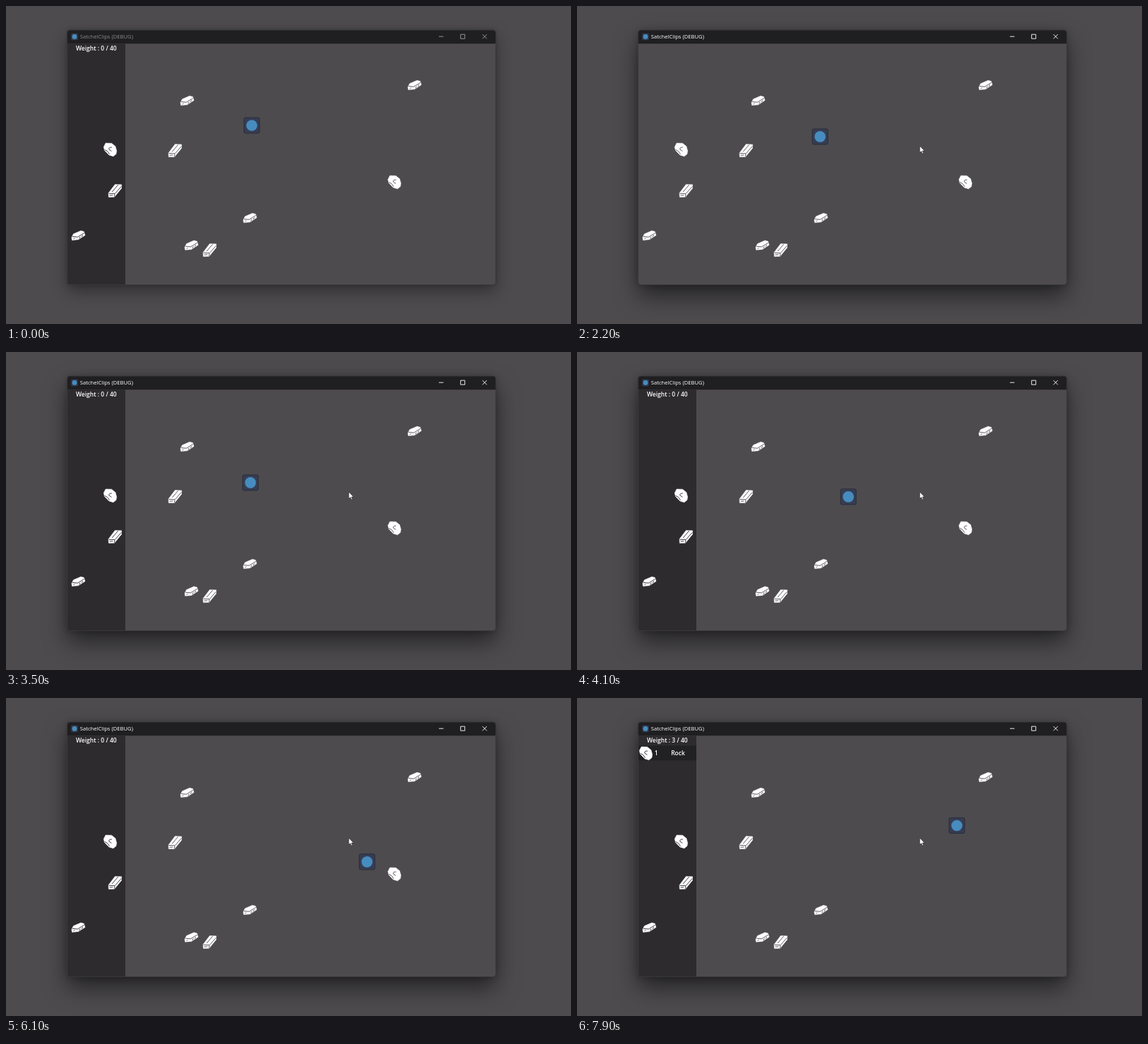
Animation, 800 px wide and 450 px high, one loop 8000 ms. Source, as an HTML page:

```html
<!DOCTYPE html>
<html lang="en">
<head>
<meta charset="utf-8">
<title>SatchelClips</title>
<style>
  html, body { margin: 0; width: 100%; height: 100%; overflow: hidden; background: #4d4b4e; }
  #stage { position: relative; width: 800px; height: 450px; overflow: hidden; background: #4d4b4e; }
  #shade { position: absolute; left: 87px; top: 34px; width: 606px; height: 360px; border-radius: 4px;
    box-shadow: 0 9px 22px rgba(0,0,0,.4), 0 0 5px rgba(0,0,0,.25); }
  .focus #shade { box-shadow: 0 16px 32px rgba(0,0,0,.54), 0 1px 9px rgba(0,0,0,.27); }
  svg { position: absolute; left: 0; top: 0; }
  .bar { fill: #8b8a8c; stroke: #a2a1a3; }
  .focus .bar { fill: #fff; stroke: #fff; }
  .bar text { font: 500 7.65px "Open Sans", "Noto Sans", sans-serif; stroke: none; }
  .bar path { fill: none; stroke-width: .9; }
  .hud text { font: 600 8.5px "Open Sans", "Noto Sans", sans-serif; fill: #fff; }
  .body { fill: #fff; stroke: #fff; stroke-width: .5; stroke-linejoin: round; }
  .cut { fill: none; stroke: #000; stroke-width: .9; stroke-linecap: round; stroke-linejoin: round; }
</style>
</head>
<body>
<div id="stage">
  <div id="shade"></div>
  <svg width="800" height="450" viewBox="0 0 800 450">
    <defs>
      <clipPath id="frame"><rect x="86.5" y="34" width="607" height="360.5" rx="4"/></clipPath>

      <mask id="ingotMask" maskUnits="userSpaceOnUse" x="-12" y="-12" width="24" height="24">
        <path class="body" d="M-9.5 3L-7-2.2L3.6-6.8L8-5.6L9.6-.4L0 5.8L-8.8 6.6Z"/>
        <path class="cut" d="M-8 1.6L-1 2.2L8-3.4M-6.6 5L-5.4 3.8M1.4 4L2.6 2M5 1.6L6-.4"/>
      </mask>
      <g id="ingot"><rect x="-12" y="-12" width="24" height="24" fill="#fff" mask="url(#ingotMask)"/></g>

      <mask id="plankMask" maskUnits="userSpaceOnUse" x="-12" y="-12" width="24" height="24">
        <path class="body" d="M-9.4 3.4L0-9L9.3-8.6L9-3.2L-.8 8.8L-9 9Z"/>
        <path class="cut" d="M-4 1.4L4-8M.4 3.6L8.4-5.6M-8.6 3.9L-.4 4.2L-.8 8M-7.4 6.6L-3.4 6.4"/>
      </mask>
      <g id="plank"><rect x="-12" y="-12" width="24" height="24" fill="#fff" mask="url(#plankMask)"/></g>

      <mask id="rockMask" maskUnits="userSpaceOnUse" x="-12" y="-12" width="24" height="24">
        <path class="body" d="M-9.2-3.6L-6.4-9L2-8.8L7.4-4.4L9.2 2L8.4 6.6L4.4 9.8L-1.6 8L-8 1.4Z"/>
        <path class="cut" d="M-7.6 .6L-4 2.4L-1.2 6.4M2-3Q-2.4-3.2-1.6 0L1.6 2.2"/>
      </mask>
      <g id="rock"><rect x="-12" y="-12" width="24" height="24" fill="#fff" mask="url(#rockMask)"/></g>

      <g id="hero">
        <rect x="-11" y="-11" width="22" height="22" rx="2" fill="#363d52" stroke="#242a3a" stroke-width=".9"/>
        <circle r="7.8" fill="#478cbf"/>
      </g>
    </defs>

    <g clip-path="url(#frame)">
      <rect x="86" y="34" width="608" height="361" fill="#4d4b4e"/>
      <rect x="86" y="34" width="608" height="19.3" fill="#1f1e20"/>
      <g id="panel" class="hud">
        <rect x="87" y="53.3" width="82" height="341" fill="#2d2b2e"/>
        <text id="weight" x="127.8" y="62.6" text-anchor="middle"></text>
        <g id="row">
          <rect x="87" y="67.5" width="82" height="20.8" fill="#212022"/>
          <use href="#rock" x="97.5" y="78"/>
          <text x="109.8" y="81">1</text>
          <text x="143" y="81" text-anchor="middle">Rock</text>
        </g>
      </g>
    </g>
    <rect x="86.6" y="34.2" width="606.8" height="360.3" rx="4" fill="none" stroke="#3b393c" stroke-width=".7"/>

    <use href="#hero" transform="translate(97 43.4) scale(.43)"/>
    <g class="bar">
      <text x="104.8" y="46.2">SatchelClips (DEBUG)</text>
      <path d="M613 43.2H619.4M643.7 40.2H649.7V46.2H643.7ZM674.6 40.1L680.8 46.3M680.8 40.1L674.6 46.3"/>
    </g>

    <g id="items"></g>
    <use id="player" href="#hero"/>
    <path id="cursor" d="M0 0V9.6L2.2 7.6L3.7 10.9L5.2 10.2L3.8 7H6.8Z" fill="#fff" stroke="#222" stroke-width=".6"/>
  </svg>
</div>
<script>
const LOOP = 8000, STEP = 100;
const FOCUS_AT = 700, PICK_AT = 6500;
const TOGGLES = [2200, 2600, 2900, 3100];

const ITEMS = {
  ingot: [[256.5, 134], [578.5, 112], [102.4, 324.8], [345.4, 300], [262.5, 338.6]],
  plank: [[239.4, 204.6], [154.4, 261.4], [288.4, 345.4]],
  rock: [[147.5, 203], [550, 249]]
};

// The player walks at one speed while a key is held: [press, release] in ms.
const HOME = [348, 169], SPEED = 0.0635;
const KEYS = {
  right: [[1020, 1060], [1660, 1780], [3470, 6470], [7850, 7900]],
  left: [[1150, 1370]],
  down: [[1200, 1450], [3785, 4305], [4400, 4570], [5500, 5755], [6530, 6700]],
  up: [[4820, 5025], [6920, 7900]]
};

const $ = id => document.getElementById(id);
const place = (el, x, y) => el.setAttribute("transform", `translate(${x} ${y})`);
const show = (el, on) => { el.style.display = on ? "" : "none"; };
const mix = (a, b, k) => a + (b - a) * k;
const clamp = (v, lo, hi) => Math.min(hi, Math.max(lo, v));

const held = (key, t) =>
  KEYS[key].reduce((sum, [on, off]) => sum + clamp(t, on, off) - on, 0);
const walk = t => [
  HOME[0] + SPEED * (held("right", t) - held("left", t)),
  HOME[1] + SPEED * (held("down", t) - held("up", t))
];

let pickup;
for (const kind in ITEMS) {
  for (const [x, y] of ITEMS[kind]) {
    const el = document.createElementNS("http://www.w3.org/2000/svg", "use");
    el.setAttribute("href", "#" + kind);
    place(el, x, y);
    $("items").append(el);
    pickup = el; // the last rock is the one collected
  }
}

function draw(time) {
  const t = Math.floor((time % LOOP) / STEP) * STEP;
  const picked = t >= PICK_AT;
  $("stage").classList.toggle("focus", t >= FOCUS_AT);
  show($("panel"), TOGGLES.filter(at => t >= at).length % 2 === 0);
  show($("row"), picked);
  show(pickup, !picked);
  $("weight").textContent = `Weight : ${picked ? 3 : 0} / 40`;
  place($("player"), ...walk(t));

  const ease = 1 - (1 - clamp((t - 100) / 700, 0, 1)) ** 2;
  show($("cursor"), t >= 100);
  place($("cursor"), mix(768, 485.3, ease), mix(271, 198, ease));
}

const start = performance.now();
function tick(now) {
  draw(Math.max(0, now - start));
  requestAnimationFrame(tick);
}
draw(0);
requestAnimationFrame(tick);
</script>
</body>
</html>
```
